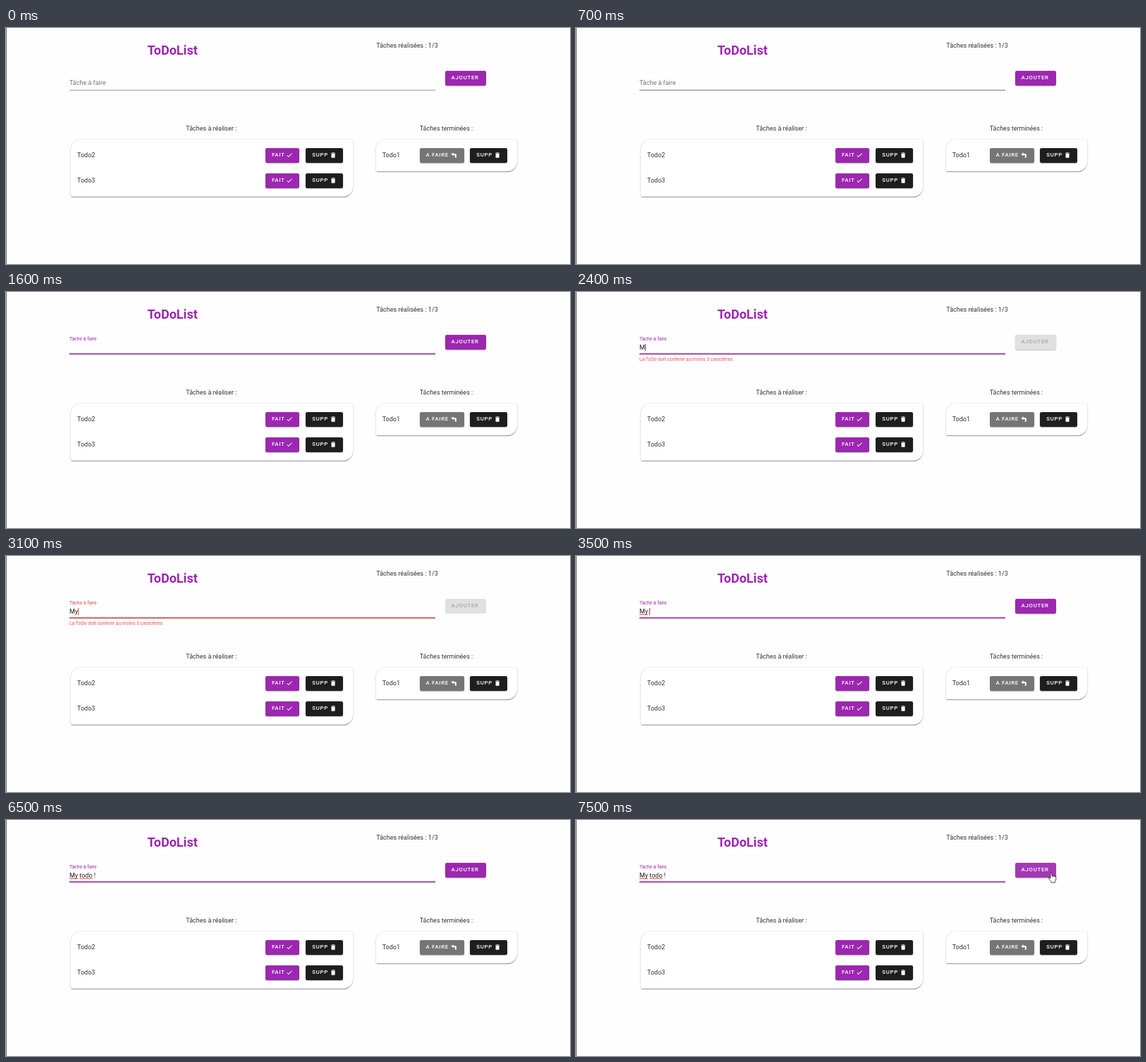
Write an HTML page that moves like this. It is 800 by 336 pixels and loops after 8 s.

```html
<!DOCTYPE html>
<html lang="fr">
<head>
<meta charset="utf-8">
<title>Liste de tâches</title>
<style>
  html, body { margin: 0; width: 100%; height: 100%; overflow: hidden; background: #fefefe; }
  #stage { position: relative; width: 800px; height: 336px; overflow: hidden; font: 9px/12px Roboto, sans-serif; color: #333; --accent: #9c27b0; }
  #stage > * { position: absolute; white-space: pre; box-sizing: border-box; }
  #edge { left: 0; top: 0; width: 1px; height: 336px; background: #777; }
  .title { font-size: 18px; font-weight: 700; color: var(--accent); }
  .card, .btn { box-shadow: 0 1.7px .6px -1.1px rgba(0,0,0,.2), 0 1.1px 1.1px rgba(0,0,0,.14), 0 .6px 2.8px rgba(0,0,0,.12); }
  .card { background: #fff; border-radius: 13.5px 2.25px; box-shadow: 0 1.7px .6px -1.1px rgba(0,0,0,.3), 0 1.1px 1.1px rgba(0,0,0,.2), 0 .6px 2.8px rgba(0,0,0,.2); }
  .btn { height: 20.25px; padding-left: 9px; border-radius: 2.25px; color: #fff; font: 500 7.875px/20.25px Roboto, sans-serif; letter-spacing: .0893em; }
  .btn svg { position: absolute; right: 9px; top: 5px; width: 10.125px; height: 10.125px; fill: #fff; }
  #label { left: 90px; top: 73.3px; line-height: 11.25px; transform-origin: 0 0; }
  #typed { left: 90px; top: 73px; color: #222; }
  .misspelt { text-decoration: underline #e55 .8px; text-underline-offset: 1px; text-decoration-skip-ink: none; }
  #caret { display: inline-block; width: .8px; height: 10.5px; margin-right: -1px; vertical-align: -2px; background: var(--line); }
  #hint { font-size: 6.75px; color: #f05252; }
  #overlay { left: 0; top: 0; width: 800px; height: 336px; }
</style>
</head>
<body>
<div id="stage"><div id="edge"></div></div>
<script>
const stage = document.getElementById('stage');
const PURPLE = '#9c27b0', RED = '#e04848', DARK = '#1e1e1e';
const LOOP = 8000, FOCUS = 1010, INVALID = 2370, VALID = 3200, BLINK = 530;
const keys = [[2370, 'M'], [2970, 'y'], [3200, ' '], [4070, 't'], [4370, 'o'], [4870, 'd'], [4960, 'o'], [5600, ' '], [5900, '!']];
const icons = {
  check: 'M21 7L9 19l-5.5-5.5 1.41-1.41L9 16.17 19.59 5.59z',
  bin: 'M19 4h-3.5l-1-1h-5l-1 1H5v2h14zM6 19a2 2 0 0 0 2 2h8a2 2 0 0 0 2-2V7H6z',
  back: 'M3 9l8-6v4h6q4 0 4 4v9h-5v-8h-5v3z'
};

function add(html, style, cls = '', id = '') {
  const el = document.createElement('div');
  el.innerHTML = html;
  el.className = cls;
  el.id = id;
  Object.assign(el.style, style);
  stage.append(el);
  return el;
}
const text = (x, midY, str, cls, id) => add(str, { left: x + 'px', top: midY - 6 + 'px' }, cls, id);
const card = (x, y, w, h) => add('', { left: x + 'px', top: y + 'px', width: w + 'px', height: h + 'px' }, 'card');
function button(x, y, w, str, background, icon) {
  const svg = icon ? `<svg viewBox="0 0 24 24"><path d="${icons[icon]}"/></svg>` : '';
  return add(str + svg, { left: x + 'px', top: y + 'px', width: w + 'px', background }, 'btn');
}

text(200.5, 32, 'ToDoList', 'title');
text(525.3, 25, 'Tâches réalisées : 1/3');
text(255.3, 142.5, 'Tâches à réaliser :');
text(586.7, 142.5, 'Tâches terminées :');
card(92.3, 159, 399.4, 81);
card(524.5, 159, 200, 45);
['Todo2', 'Todo3'].forEach((name, i) => {
  const y = 171.4 + 36 * i;
  text(101, y + 10, name);
  button(368, y, 48.3, 'FAIT', PURPLE, 'check');
  button(425.3, y, 53, 'SUPP', DARK, 'bin');
});
text(533.7, 181.4, 'Todo1');
button(586.5, 171.4, 63, 'A FAIRE', '#757575', 'back');
button(658.3, 171.4, 53, 'SUPP', DARK, 'bin');

const submit = button(622.5, 61.3, 58, 'AJOUTER', PURPLE);
const label = add('Tâche à faire', {}, '', 'label');
const typed = add('', {}, '', 'typed');
const hint = text(90, 96, 'La ToDo doit contenir au moins 3 caractères', '', 'hint');
const overlay = add(`<svg width="800" height="336">
  <rect id="base" x="90" y="88" width="519" height=".9"/>
  <rect id="active" y="87.4" height="1.4"/>
  <g fill="#fff" stroke="#222" stroke-width=".8" stroke-linejoin="round">
    <path id="arrow" d="M0 0v10l2.3-2.1 1.6 3.6 1.6-.7-1.6-3.5h3.2z"/>
    <path id="hand" d="M-1 1Q0-.3 1 1V5q1-.8 2 .2 1.1-.7 2 .4 1.5-.4 1.8.9V9q0 2-1.3 3.3V14H0v-1.2L-3.7 8.3Q-3.6 6.6-2.1 7.2L-1 8.4z"/>
  </g></svg>`, {}, '', 'overlay');
const [base, active, arrow, hand] = overlay.querySelectorAll('rect, path');

const clamp = v => Math.min(1, Math.max(0, v));
const ramp = (t, start, duration) => clamp((t - start) / duration);
const mix = (a, b, k) => `color-mix(in srgb, ${b} ${k * 100}%, ${a})`;

// Height of cubic-bezier(.25, .8, .5, 1) at progress p
function swift(p) {
  let lo = 0, hi = 1;
  for (let i = 0; i < 20; i++) {
    const s = (lo + hi) / 2, u = 1 - s;
    if (.75 * u * u * s + 1.5 * u * s * s + s ** 3 < p) lo = s; else hi = s;
  }
  const u = 1 - lo;
  return 2.4 * u * u * lo + 3 * u * lo * lo + lo ** 3;
}

const route = [[6560, 280, 78], [6750, 480, 112], [6950, 752, 112], [7100, 684, 77], [7230, 684, 77], [7300, 674, 75]];
function pointer(t) {
  const i = route.findIndex(p => p[0] > t);
  if (i < 0) return route.at(-1).slice(1);
  if (i === 0) return null;
  const [t0, x0, y0] = route[i - 1], [t1, x1, y1] = route[i];
  const k = (t - t0) / (t1 - t0);
  return [x0 + (x1 - x0) * k, y0 + (y1 - y0) * k];
}

function drawField(t) {
  const focus = swift(ramp(t, FOCUS, 300));
  const error = swift(ramp(t, INVALID + 50, 350)) - swift(ramp(t, VALID, 300));
  const line = mix(PURPLE, RED, error);
  stage.style.setProperty('--line', line);
  label.style.color = t < FOCUS ? '#757575' : line;
  label.style.transform = `translateY(${-10.125 * focus}px) scale(${1 - .25 * focus})`;
  base.setAttribute('fill', mix('#949494', '#222', ramp(t, 600, 300)));
  active.setAttribute('fill', line);
  active.setAttribute('x', 349.5 - 259.5 * focus);
  active.setAttribute('width', 519 * focus);

  const pressed = keys.filter(k => k[0] <= t);
  const lastEdit = pressed.length ? pressed.at(-1)[0] : FOCUS;
  const caretOn = t >= FOCUS && Math.floor((t - lastEdit) / BLINK) % 2 === 0;
  let html = pressed.map(k => k[1]).join('');
  if (t >= 3450) html = html.replace('My', '<span class="misspelt">My</span>');
  if (t >= 5600) html = html.replace('todo', '<span class="misspelt">todo</span>');
  typed.innerHTML = html + (caretOn ? '<i id="caret"></i>' : '');
}

function drawSubmit(t) {
  const disabled = t >= INVALID && t < VALID;
  const shadow = 1 - ramp(t, INVALID, 280) + ramp(t, VALID, 280);
  hint.style.opacity = disabled ? 1 : 1 - ramp(t, VALID, 150);
  hint.style.visibility = t < INVALID ? 'hidden' : 'visible';
  submit.style.background = disabled ? '#e0e0e0' : mix(PURPLE, '#a438b6', ramp(t, 7280, 200));
  submit.style.color = disabled ? '#a8a8a8' : '#fff';
  submit.style.boxShadow = `0 1.7px .6px -1.1px rgba(0,0,0,${.2 * shadow}), 0 1.1px 1.1px rgba(0,0,0,${.14 * shadow}), 0 .6px 2.8px rgba(0,0,0,${.12 * shadow})`;
}

function drawPointer(t) {
  const at = pointer(t), overButton = t >= 7270;
  arrow.style.display = at && !overButton ? '' : 'none';
  hand.style.display = at && overButton ? '' : 'none';
  if (at) (overButton ? hand : arrow).setAttribute('transform', `translate(${at})`);
}

function frame() {
  const t = performance.now() % LOOP;
  drawField(t);
  drawSubmit(t);
  drawPointer(t);
  requestAnimationFrame(frame);
}
frame();
</script>
</body>
</html>
```
